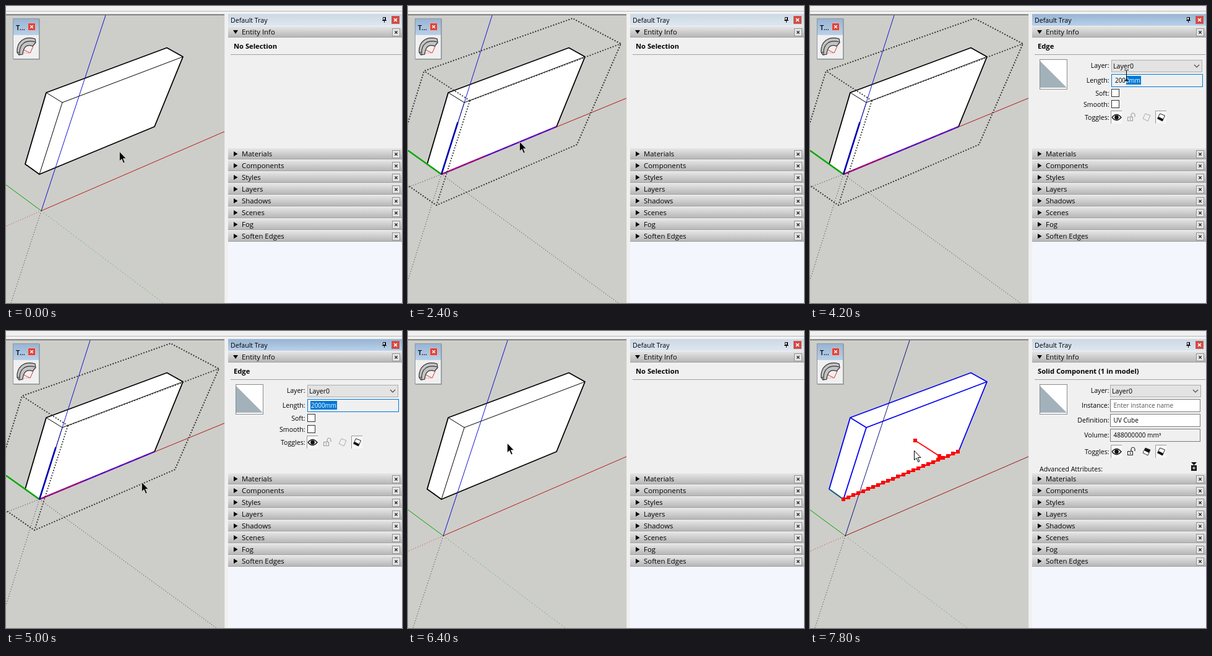
Write an HTML page with a canvas that moves like this. It is 640 by 480 pixels and loops after 8 s.

```html
<!DOCTYPE html>
<html lang="en">
<head>
<meta charset="utf-8">
<title>Edge length and bend tool</title>
<style>
html, body { margin: 0; width: 100%; height: 100%; overflow: hidden; background: #f0f0f0; }
canvas { display: block; width: 640px; height: 480px; }
</style>
</head>
<body>
<canvas id="stage" width="640" height="480"></canvas>
<script>
const ctx = document.getElementById('stage').getContext('2d');
const LOOP = 8000;
const FONT = '"Open Sans", "Noto Sans", sans-serif';

// Pointer stops: time, x, y, shape
const POINTER = [
  [0, 183, 235, 'black'], [600, 176, 218, 'black'], [800, 179, 207, 'black'],
  [2000, 180, 219, 'black'], [3000, 200, 217, 'black'], [3200, 310, 198, 'black'],
  [3400, 455, 161, 'white'], [3600, 518, 135, 'white'], [3800, 532, 128, 'beam'],
  [4000, 538, 127, 'beam'], [4200, 511, 112, 'beam'], [4400, 490, 95, 'beam'],
  [5000, 219, 244, 'black'], [5200, 206, 262, 'black'], [6000, 185, 233, 'black'],
  [6200, 166, 200, 'black'], [6400, 160, 181, 'black'], [6800, 92, 128, 'black'],
  [7000, 36, 80, 'white'], [7400, 70, 118, 'white'], [7600, 138, 176, 'white'],
  [7800, 168, 193, 'white']
];

// Corners of the board
const A = [65, 140], B = [260, 67.5], C = [286, 82], D = [240, 195],
      E = [54, 272], F = [31, 255.5], G = [91, 156];

function path(pts, close) {
  ctx.beginPath();
  pts.forEach(([x, y], i) => i ? ctx.lineTo(x, y) : ctx.moveTo(x, y));
  if (close) ctx.closePath();
}
function line(pts, color, width = 1, dash = [], close = false) {
  path(pts, close);
  ctx.strokeStyle = color;
  ctx.lineWidth = width;
  ctx.setLineDash(dash);
  ctx.stroke();
  ctx.setLineDash([]);
}
function shape(pts, color) {
  path(pts, true);
  ctx.fillStyle = color;
  ctx.fill();
}
function rect(x, y, w, h, fill, border) {
  ctx.fillStyle = fill;
  ctx.fillRect(x, y, w, h);
  if (border) {
    ctx.strokeStyle = border;
    ctx.lineWidth = 1;
    ctx.strokeRect(x + .5, y + .5, w - 1, h - 1);
  }
}
function fade(y, h, top, bottom) {
  const g = ctx.createLinearGradient(0, y, 0, y + h);
  g.addColorStop(0, top);
  g.addColorStop(1, bottom);
  return g;
}
function text(s, x, y, size, color = '#000', weight = 400, align = 'left') {
  ctx.font = `${weight} ${size}px ${FONT}`;
  ctx.textAlign = align;
  ctx.fillStyle = color;
  ctx.fillText(s, x, y);
}
function cross(x, y, r, color, width) {
  line([[x - r, y - r], [x + r, y + r]], color, width);
  line([[x + r, y - r], [x - r, y + r]], color, width);
}

function worldAxes(selected) {
  const o = [57, 331];
  line([o, [0, 356]], '#e02020', 1, [1, 3]);
  line([o, [254, 480]], '#10a010', 1, [1, 4]);
  line([o, [8, 480]], '#202030', 1, [1, 3]);
  line([o, [0, 289]], '#00a000');
  line([o, [353, 203]], selected ? '#a01010' : '#b81818');
  line([o, [161, 15]], selected ? '#101080' : '#1010d0');
}

function board(color, inner) {
  shape([A, B, C, D, E, F], '#fff');
  line([A, G, C], color, inner);
  line([G, E], color, inner);
  ctx.lineJoin = 'round';
  line([A, B, C, D, E, F], color, 1.8, [], true);
}

function editScene(edgeOn) {
  for (const end of [[0, 293], [340, 480], [0, 443]]) line([E, end], '#222', 1, [1, 3]);
  board('#000', 1);
  line([E, [353, 149]], '#b01515');
  line([E, [136, 15]], '#1515d0');
  line([E, D], '#000', 1.8);
  line([E, [126, 242]], '#c00010', 2);
  if (edgeOn) {
    line([E, D], '#7a12c4', 2);
    line([E, [126, 242]], '#c01060', 2, [6, 5]);
    line([[126, 242], D], '#4010e0', 1.4, [7, 8]);
  }
  line([E, [0, 233.5]], '#00a800', 2.4);
  line([E, [80.5, 188]], '#0000b0', 2.6);

  const near = [100, 153], left = [26, 105], right = [344, 61], low = [46, 322];
  const dots = [2, 2.4];
  line([[-26, 272], left, [266, 20], right, [273, 224], low, [-26, 272]], '#333', 2, dots);
  for (const end of [left, right, low]) line([near, end], '#333', 1.8, dots);
}

function bendGuide() {
  line([F, E], '#108040', 1.5);
  line([E, D], '#f00', 2);
  line([[170, 177], [209, 202], [211, 207]], '#f00', 1.8);
  const mark = (x, y) => rect(Math.round(x) - 3, Math.round(y) - 3, 6, 6, '#f00');
  for (let i = 0; i <= 23; i++) mark(54 + i * 185 / 23, 272 - i * 77 / 23);
  mark(170, 177);
  mark(209, 202);
}

function viewport(t) {
  rect(0, 13, 354, 467, '#cdcec9');
  ctx.save();
  ctx.beginPath();
  ctx.rect(0, 14, 353, 466);
  ctx.clip();
  if (t >= 1200 && t < 5600) {
    editScene(t >= 2400);
  } else {
    const selected = t >= 6600;
    board(selected ? '#0000f0' : '#000', selected ? 1.8 : 1);
    worldAxes(selected);
    if (t >= 7400) bendGuide();
  }
  ctx.restore();
  rect(0, 13, 354, 1, '#a0a0a0');
  rect(0, 14, 354, 1, '#696969');
  rect(353, 13, 1, 467, '#e8e8e8');
  toolbox(t >= 7000 && t < 7400);
}

function toolbox(hover) {
  rect(12, 21, 43, 66, '#a8a8a4');
  rect(11, 20, 43, 66, '#f0f0f0', '#8e979f');
  rect(12, 21, 41, 26, fade(21, 26, '#98b5d5', '#b8d0e8'));
  text('T...', 16, 39, 11.2, '#000', 600);
  rect(35, 27, 13, 13, '#d9463e', '#f0b0a8');
  cross(41.5, 33.5, 2.3, '#fff', 1.4);
  if (hover) rect(16, 48, 35, 36, '#d9eaf9', '#b5d5f2');

  ctx.beginPath();
  ctx.moveTo(18, 75);
  ctx.bezierCurveTo(17, 58, 29, 48, 47, 53);
  ctx.lineTo(48, 59);
  ctx.lineTo(43, 65);
  ctx.bezierCurveTo(34, 61, 28, 66, 27, 78);
  ctx.lineTo(21, 79);
  ctx.closePath();
  ctx.fillStyle = '#c4c4c4';
  ctx.fill();
  ctx.strokeStyle = '#333';
  ctx.lineWidth = 1.2;
  ctx.stroke();
  ctx.beginPath();
  ctx.moveTo(22, 75);
  ctx.bezierCurveTo(22, 62, 31, 54, 47, 58);
  ctx.stroke();
  line([[18, 75], [22, 75], [22, 79]], '#333');
  line([[44, 65], [39, 76], [29, 71]], '#e03030', 1);
  line([[29, 76], [38, 76]], '#e88', 1, [2, 1]);
}

function header(y, label, open) {
  rect(359, y, 281, 18, fade(y, 18, '#e6e6e6', '#b4b4b4'));
  rect(359, y + 17, 281, 1, '#a4a4a4');
  const m = y + 9;
  shape(open ? [[367, m - 3], [375, m - 3], [371, m + 3]]
             : [[368, m - 4], [374.5, m], [368, m + 4]], '#000');
  text(label, 381, y + 13, 11.4);
  rect(624, y + 3, 13, 13, '#e4e4e4', '#929292');
  cross(630.5, y + 9.5, 2.1, '#111', 1.3);
}

function tray(active) {
  rect(358, 13, 282, 467, '#f0f0f0');
  rect(359, 13, 281, 19, active ? fade(13, 19, '#98b4d3', '#b9d1ea')
                                : fade(13, 19, '#ccd8e4', '#dde7f1'));
  text('Default Tray', 363, 27, 10.6);
  rect(609, 18, 5, 5, '#fff', '#111');
  rect(612, 18, 2, 5, '#111');
  rect(608, 23, 7, 1, '#111');
  rect(611, 24, 1, 3, '#111');
  rect(623, 16, 13, 13, '#d9463e', '#b8655e');
  cross(629.5, 22.5, 2.4, '#fff', 1.5);
  header(33, 'Entity Info', true);
  ['Materials', 'Components', 'Styles', 'Layers', 'Shadows', 'Scenes', 'Fog', 'Soften Edges']
    .forEach((name, i) => header(230 + i * 19, name, false));
  rect(359, 381, 281, 99, '#f3f6fd');
}

function title(s) {
  text(s, 368, 69, 11.2, '#000', 700);
  rect(363, 78, 276, 1, '#a0a0a0');
}
function label(s, y) {
  text(s, 483.5, y, 10.6, '#000', 400, 'right');
}

function thumbAndLayer(x) {
  rect(371, 86, 45, 49, '#fff', '#8c8c8c');
  shape([[372, 89], [372, 132], [415, 132]], '#a3b1ba');
  label('Layer:', 100);
  rect(x, 87, 147, 20, '#e3e3e3', '#adadad');
  text('Layer0', x + 3, 101, 10.6);
  line([[x + 134, 95], [x + 138, 99], [x + 142, 95]], '#444', 1.1);
}

function toggles(y, solid) {
  label('Toggles:', y + 4);
  for (const x of [486, 558]) {
    rect(x, y - 11, 18, 21, '#f7f7f7');
    line([[x + .5, y + 10], [x + .5, y - 10.5], [x + 18, y - 10.5]], '#999');
  }
  ctx.beginPath();
  ctx.moveTo(488, y);
  ctx.quadraticCurveTo(495.5, y - 9, 503, y);
  ctx.quadraticCurveTo(495.5, y + 9, 488, y);
  ctx.fillStyle = '#fff';
  ctx.fill();
  ctx.strokeStyle = '#111';
  ctx.lineWidth = 1.3;
  ctx.stroke();
  ctx.beginPath();
  ctx.arc(495.5, y, 3.4, 0, 7);
  ctx.fillStyle = '#111';
  ctx.fill();

  const lock = solid ? '#222' : '#999';
  rect(513, y - 1, 9, 7, '#f0f0f0', lock);
  rect(517, y + 1, 1, 3, lock);
  ctx.beginPath();
  ctx.arc(522, y - 4, 3, Math.PI, 0);
  ctx.strokeStyle = lock;
  ctx.stroke();
  line([[519, y - 4], [519, y]], lock, 1.2);
  line([[525, y - 4], [525, y - 1]], lock, 1.2);

  const tilt = (x, fill, edge, top, bottom) => {
    const pts = [[x - 2, y - 6], [x + 6, y - 3], [x + 2, y + 6], [x - 6, y + 2]];
    shape(pts, fill);
    if (top) shape([pts[0], pts[1], [x + 4, y + 2], [x - 4, y - 2]], '#111');
    if (bottom) shape([[x - 4, y - 1], [x + 4, y + 3], pts[2], pts[3]], '#111');
    line(pts, edge, 1, [], true);
  };
  tilt(544, solid ? '#fff' : '#f0f0f0', solid ? '#333' : '#aaa', solid, false);
  tilt(567.5, '#fff', '#222', false, true);
}

function edgeInfo(t) {
  title('Edge');
  thumbAndLayer(487);
  const active = t >= 4200;
  label('Length:', 124);
  rect(487, 110, 148, 21, '#f0f0f0', active ? '#0078d7' : '#858585');
  text('2000mm', 493, 124, 9.9);
  if (active) {
    const from = t < 4400 ? 511 : 492;
    rect(from, 113, 535 - from, 14, '#0078d7');
    ctx.save();
    ctx.beginPath();
    ctx.rect(from, 113, 535 - from, 14);
    ctx.clip();
    text('2000mm', 493, 124, 9.9, '#fff');
    ctx.restore();
  }
  label('Soft:', 145);
  label('Smooth:', 163);
  rect(487, 134, 13, 13, '#fff', '#333');
  rect(487, 152, 13, 13, '#fff', t >= 3400 && t < 3800 ? '#2a6496' : '#333');
  toggles(180, false);
}

function solidInfo() {
  title('Solid Component (1 in model)');
  thumbAndLayer(485);
  const row = (name, value, y, fill, color) => {
    label(name, y + 4);
    rect(485, y - 10, 146, 21, fill, '#7a7a7a');
    text(value, 490.5, y + 4, 10.1, color);
  };
  row('Instance:', 'Enter instance name', 120, '#fff', '#555');
  row('Definition:', 'UV Cube', 144, '#fff');
  row('Volume:', '488000000 mm³', 168, '#f0f0f0');
  toggles(195, true);
  text('Advanced Attributes:', 371, 227, 10.5);
  shape([[616, 212], [625, 212], [620.5, 217]], '#111');
  rect(616, 217, 9, 9, '#111');
  rect(618, 221, 5, 1, '#fff');
  rect(620, 219, 1, 5, '#fff');
}

function pointer(t) {
  const [, x, y, kind] = POINTER.filter(p => p[0] <= t).pop();
  ctx.save();
  ctx.translate(x, y);
  if (kind === 'beam') {
    rect(0, -8, 1, 17, '#000');
    for (const end of [-9, 8]) {
      rect(-3, end, 3, 1, '#000');
      rect(1, end, 3, 1, '#000');
    }
  } else {
    const arrow = [[.5, .5], [.5, 15.5], [4, 12.3], [6.8, 18.7], [9, 17.7], [6.3, 11.5], [11, 11.5]];
    const black = kind === 'black';
    shape(arrow, black ? '#000' : '#fff');
    line(arrow, black ? '#eee' : '#000', black ? .6 : 1, [], true);
  }
  ctx.restore();
}

function draw(t) {
  rect(0, 0, 640, 480, '#f0f0f0');
  rect(0, 8, 640, 1, '#b4b4b4');
  rect(0, 9, 640, 1, '#fafafa');
  viewport(t);
  tray(t >= 4200 && t < 5600);
  if (t >= 6800) solidInfo();
  else if (t >= 3000 && t < 5600) edgeInfo(t);
  else title('No Selection');
  pointer(t);
}

const start = performance.now();
function tick() {
  draw((performance.now() - start) % LOOP);
  requestAnimationFrame(tick);
}
tick();
</script>
</body>
</html>
```
